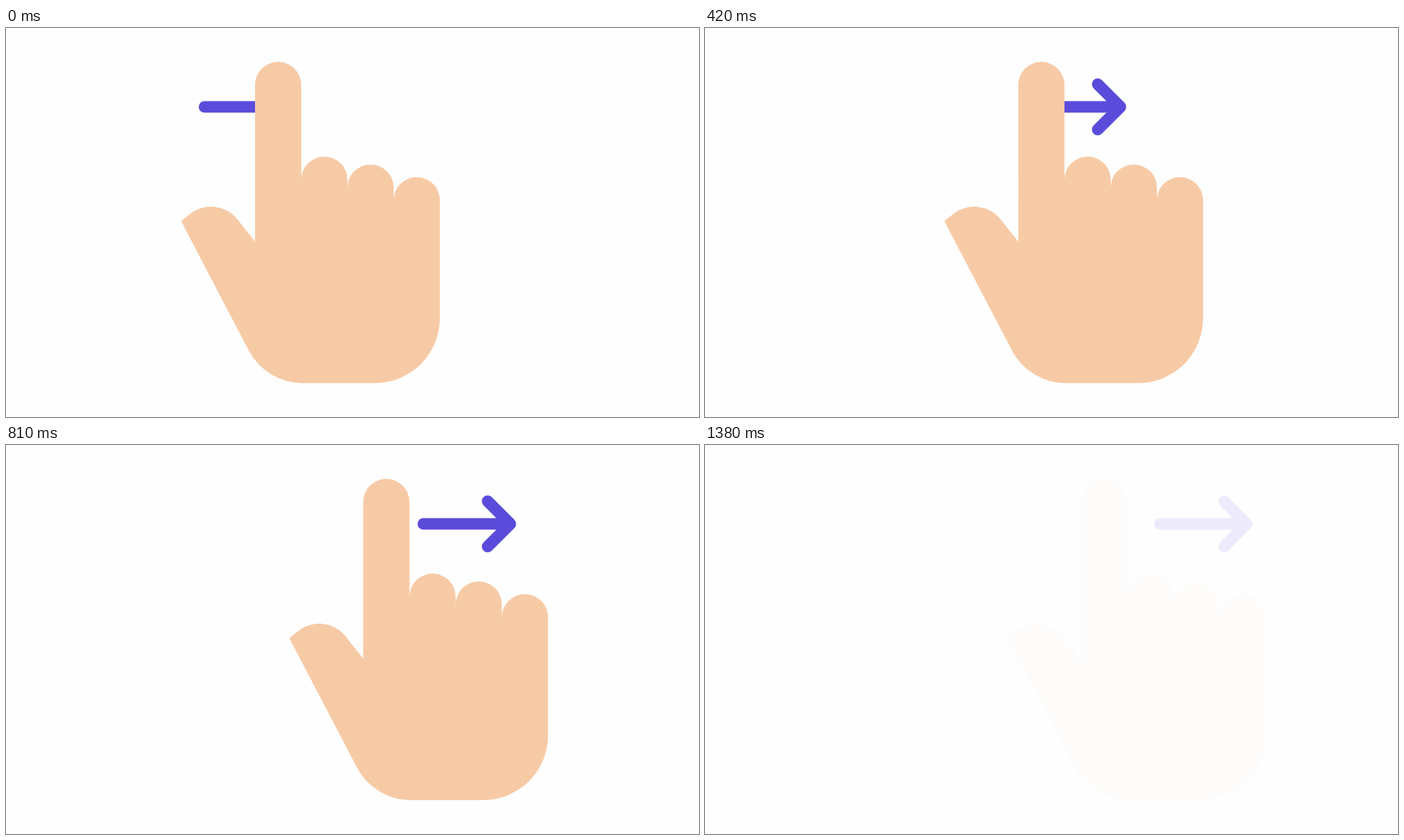
Recreate the animation shown at these times as an HTML page with a canvas. Size 960x540 px, loop 1.71 s.

```html
<!DOCTYPE html>
<html lang="en">
<head>
<meta charset="utf-8">
<title>Swipe right</title>
<style>
  html, body { margin: 0; width: 100%; height: 100%; overflow: hidden; background: #fefefe; }
  canvas { display: block; }
</style>
</head>
<body>
<canvas id="stage" width="960" height="540"></canvas>
<script>
const ctx = document.getElementById('stage').getContext('2d');
const LOOP = 1710, STEP = 30, MOVE_END = 1380;
const HAND_TRAVEL = 175.5, ARROW_TRAVEL = 355;

// Progress of the swipe: [time in ms, progress, speed per second]
const swipe = [
  [0, 0, 0.65], [270, 0.316, 1.45], [420, 0.507, 1.05], [540, 0.617, 0.86],
  [660, 0.72, 0.93], [810, 0.854, 0.65], [1020, 0.931, 0.27], [1380, 1, 0.1]
];

function hermite(keys, t) {
  const i = Math.max(1, keys.findIndex(k => k[0] >= t));
  const [t0, p0, v0] = keys[i - 1], [t1, p1, v1] = keys[i];
  const span = t1 - t0, u = (t - t0) / span, w = 1 - u;
  return p0 * (1 + 2 * u) * w * w + p1 * u * u * (3 - 2 * u)
    + span / 1000 * u * w * (v0 * w - v1 * u);
}

// cubic-bezier(.25, .1, .25, 1)
function ease(x) {
  if (x <= 0 || x >= 1) return x <= 0 ? 0 : 1;
  const bezier = (a, b, s) => 3 * a * s * (1 - s) ** 2 + 3 * b * s * s * (1 - s) + s ** 3;
  let lo = 0, hi = 1;
  for (let i = 0; i < 24; i++) {
    const mid = (lo + hi) / 2;
    if (bezier(0.25, 0.25, mid) < x) lo = mid; else hi = mid;
  }
  return bezier(0.1, 1, lo);
}

function drawArrow(dx, alpha) {
  const tip = 395.5 + dx, y = 109.5, arm = 31.5;
  ctx.globalAlpha = alpha;
  ctx.strokeStyle = '#5b4bdb';
  ctx.lineWidth = 16;
  ctx.lineCap = ctx.lineJoin = 'round';
  ctx.beginPath();
  ctx.moveTo(275 + dx, y);
  ctx.lineTo(tip, y);
  ctx.moveTo(tip - arm, y - arm);
  ctx.lineTo(tip, y);
  ctx.lineTo(tip - arm, y + arm);
  ctx.stroke();
}

function drawHand(dx, alpha) {
  ctx.save();
  ctx.translate(dx, 0);
  ctx.globalAlpha = alpha;
  ctx.fillStyle = '#f7caa6';
  ctx.beginPath();
  ctx.moveTo(345, 296.5);
  // Fingertips, left to right
  [79, 210.5, 221.5, 239].forEach((y, i) => ctx.arc(377 + 64 * i, y, 32, Math.PI, 0));
  // Palm
  ctx.arcTo(601, 493, 511, 493, 90);
  ctx.arcTo(360, 493, 242.5, 268, 84);
  ctx.lineTo(242.5, 268);
  // Thumb
  const lean = Math.atan2(30, 36);
  ctx.arc(284, 295, 47, lean - Math.PI * 3 / 2 + Math.PI * 2 - Math.PI * 2 + Math.PI / 2 - lean + Math.atan2(36, 30), -lean);
  ctx.closePath();
  ctx.fill();
  ctx.restore();
}

function draw(time) {
  const t = Math.min(Math.floor(time % LOOP / STEP) * STEP, MOVE_END);
  const progress = hermite(swipe, t);
  const alpha = 1 - ease((t - 800) / 800);
  ctx.globalAlpha = 1;
  ctx.fillStyle = '#fefefe';
  ctx.fillRect(0, 0, 960, 540);
  drawArrow(ARROW_TRAVEL * progress, Math.max(alpha, 0.1));
  drawHand(HAND_TRAVEL * progress, alpha);
}

let start;
function tick(now) {
  start ??= now;
  draw(now - start);
  requestAnimationFrame(tick);
}
draw(0);
requestAnimationFrame(tick);
</script>
</body>
</html>
```
